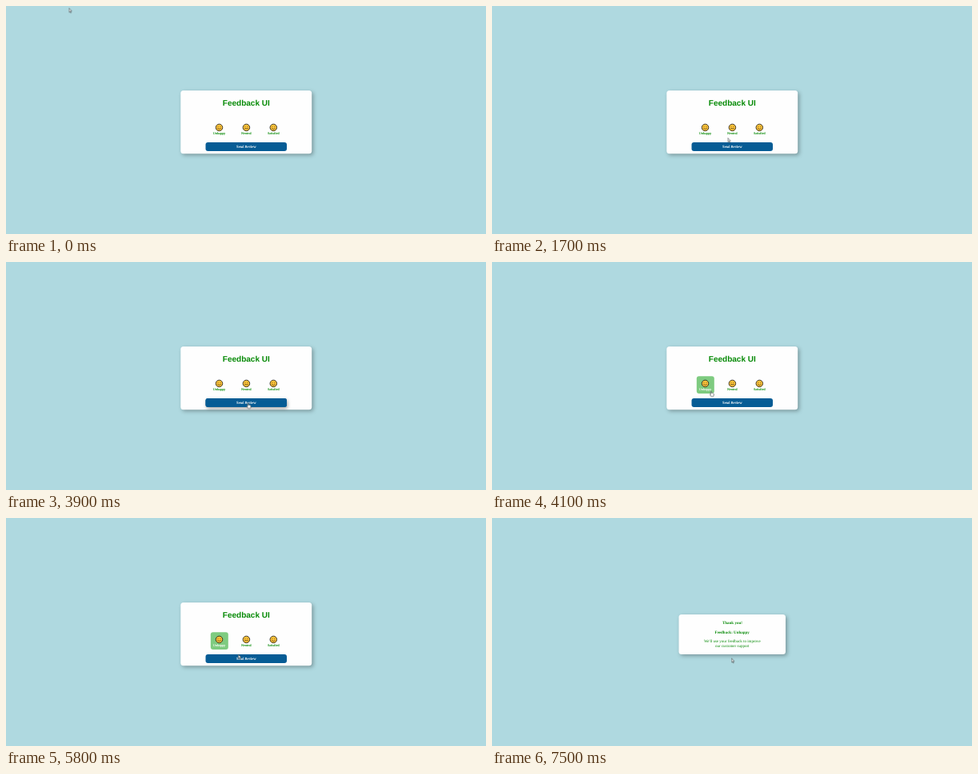
Write an HTML page that moves like this. It is 600 by 286 pixels and loops after 8000 ms.

```html
<!DOCTYPE html>
<html lang="en">
<head>
<meta charset="utf-8">
<title>Feedback UI</title>
<style>
  html, body { margin: 0; width: 100%; height: 100%; overflow: hidden; background: #afd9e0; }
  svg { display: block; width: 100vw; height: 100vh; }
  text { font: 5px "Liberation Serif", "Times New Roman", serif; fill: #068a06; text-anchor: middle; text-rendering: geometricPrecision; }
  .title { font: bold 10px "Liberation Sans", Arial, sans-serif; }
  .label { font-size: 4.2px; stroke: #068a06; stroke-width: .1; }
  .light { fill: #fff; stroke: #fff; }
  .bold { font-weight: bold; }
  .card { fill: #fefefe; filter: drop-shadow(2px 2.5px 2.5px rgba(0, 0, 0, .3)); }
  .button { fill: #065c95; }
  #glow { filter: drop-shadow(1.5px 2px 2px rgba(0, 0, 0, .35)); }
  .send { font-size: 4.65px; fill: #fff; stroke: #fff; stroke-width: .1; }
  .face { fill: #fdc238; stroke: #2b251c; stroke-width: .9; }
  .line { fill: none; stroke: #2b251c; stroke-width: .65; stroke-linecap: round; }
  .pointer { fill: #fff; stroke: #30363a; stroke-width: .6; stroke-linejoin: round; }
  #thanks, #picked, #glow, #hand { opacity: 0; }
</style>
</head>
<body>
<svg viewBox="0 0 600 286">
  <g id="form">
    <rect class="card" x="218.3" y="106" width="163.9" height="79.3" rx="3.5"/>
    <text class="title" x="300.3" y="124.7">Feedback UI</text>
    <g id="ratings"></g>
    <g id="picked">
      <rect x="255.8" y="143.2" width="22" height="21.8" rx="3" fill="#7ecb80"/>
      <g id="chosen"></g>
    </g>
    <rect class="button" id="glow" x="249.5" y="171" width="101.5" height="11" rx="3"/>
    <rect class="button" x="249.5" y="171" width="101.5" height="11" rx="3"/>
    <text class="send" x="300.4" y="178.2">Send Review</text>
  </g>
  <g id="thanks">
    <rect class="card" x="233.5" y="121" width="133.5" height="50" rx="3.5"/>
    <text class="bold" x="300.4" y="133.4">Thank you!</text>
    <text class="bold" x="300.2" y="144.6">Feedback: Unhappy</text>
    <text x="300.4" y="155.9">We'll use your feedback to improve</text>
    <text x="300.2" y="161.5">our customer support</text>
  </g>
  <g id="cursor">
    <path class="pointer" id="arrow" d="M.3.3V5.2L1.4 4.2 2.2 6.1 3 5.8 2.3 3.9H3.7Z"/>
    <path class="pointer" id="hand" d="M1.3.8Q1.8.1 2.3.8V2.8Q4.9 2.7 5.3 3.9V5.6L4.6 7.2H2L.3 4.9Q.3 4 1.3 4.6Z"/>
  </g>
</svg>
<script>
const LOOP = 8000, TICK = 100;
const byId = id => document.getElementById(id);
const play = (id, frames) => byId(id).animate(frames, { duration: LOOP, iterations: Infinity });

const rating = (name, i, tone = "") => `
  <g transform="translate(${266.5 + 33.9 * i} 152.4)">
    <circle class="face" r="4.25"/>
    <path class="line" d="M-1.6-.9h.1M1.5-.9h.1M-1.9 1.3Q0 ${[3, 1.6, 3.8][i]} 1.9 1.3"/>
    <text class="label ${tone}" y="8.2">${name}</text>
  </g>`;

byId("ratings").innerHTML = ["Unhappy", "Neutral", "Satisfied"].map(n => rating(n, i = ["Unhappy", "Neutral", "Satisfied"].indexOf(n))).join("");
byId("chosen").innerHTML = rating("Unhappy", 0, "light");

// Flips between shown and hidden at each given time.
function toggle(id, shown, ...times) {
  const frames = [0, ...times].map((t, i) =>
    ({ offset: t / LOOP, opacity: i % 2 ? 1 - shown : shown, easing: "step-end" }));
  play(id, [...frames, { ...frames[frames.length - 1], offset: 1 }]);
}

// Each move runs in even jumps, one per tick: first jump, last jump, end point.
const moves = [
  [300, 500, 208, 93],
  [800, 1200, 299, 144],
  [1400, 1700, 294.5, 165.3],
  [2300, 2300, 366, 231],
  [3100, 3100, 344, 211.3],
  [3200, 3300, 315, 184],
  [3900, 4100, 272, 161.5],
  [5300, 6100, 299.2, 175.7]
];

const at = (x, y) => `translate(${x}px, ${y}px)`;
let place = at(78.5, 2.5);
const track = [{ offset: 0, transform: place }];
for (const [first, last, x, y] of moves) {
  const jumps = (last - first) / TICK + 1;
  track.push({ offset: first / LOOP, transform: place, easing: `steps(${jumps}, start)` });
  place = at(x, y);
  track.push({ offset: (last + TICK) / LOOP, transform: place });
}
play("cursor", [...track, { offset: 1, transform: place }]);

const overLink = [1200, 1600, 3900, 5400, 5900, 7400];
toggle("hand", 0, ...overLink);
toggle("arrow", 1, ...overLink);
toggle("glow", 0, 3900, 4000, 5900, 7300);
toggle("picked", 0, 4100, 7300);
toggle("form", 1, 7300);
toggle("thanks", 0, 7300);
</script>
</body>
</html>
```
